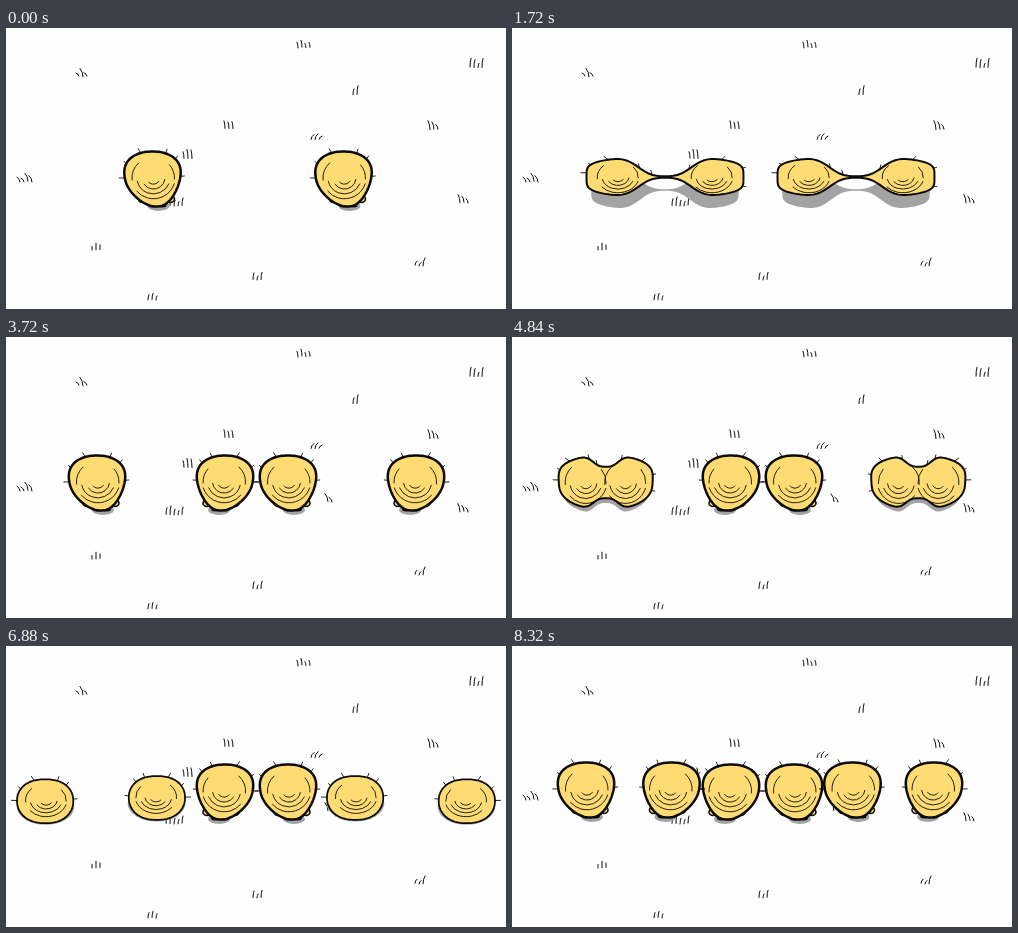
An HTML page with a canvas for the animation above (9280 ms loop, 500 px wide and 281 px high).

```html
<!DOCTYPE html>
<html lang="en">
<head>
<meta charset="utf-8">
<title>Splitting blobs</title>
<style>
  html, body { margin: 0; width: 100%; height: 100%; overflow: hidden; background: #fefefe; }
  canvas { display: block; width: 500px; height: 281px; }
</style>
</head>
<body>
<canvas id="stage" width="500" height="281"></canvas>
<script>
const LOOP = 9280, SPLIT_AT = 960, RESPLIT_AT = 4680, GATHER_AT = 7920;
const YELLOW = '#ffdc73', INK = '#0b0b0b', SHADE = '#a3a3a3', PAPER = '#fefefe';
const { PI, sin, cos, exp, abs, sign, min, max, floor } = Math;
const ctx = document.getElementById('stage').getContext('2d');
ctx.lineCap = ctx.lineJoin = 'round';

const lerp = (a, b, k) => a + (b - a) * k;
const random = seed => { const v = sin(seed * 12.9898) * 43758.5453; return v - floor(v); };
const power = (v, e) => sign(v) * abs(v) ** e;

function placed(x, y, flip, draw) {
  ctx.save();
  ctx.translate(x, y);
  if (flip) ctx.scale(-1, 1);
  draw();
  ctx.restore();
}

function ink(width) {
  ctx.strokeStyle = INK;
  ctx.lineWidth = width;
  ctx.stroke();
}

function paint(fill, width) {
  ctx.fillStyle = fill;
  ctx.fill();
  if (width) ink(width);
}

function oval(x, y, rx, ry, fill, width) {
  ctx.beginPath();
  ctx.ellipse(x, y, rx, ry, 0, 0, PI * 2);
  paint(fill, width);
}

// An outline is a function from angle to point.
function trace(outline, squeeze = 1, drop = 0) {
  ctx.beginPath();
  for (let i = 0; i < 120; i++) {
    const [x, y] = outline(i / 120 * PI * 2);
    ctx.lineTo(x * squeeze, y + drop);
  }
  ctx.closePath();
}

function body(outline, width, drawCreases) {
  trace(outline);
  paint(YELLOW, width);
  ctx.save();
  ctx.clip();
  drawCreases();
  ctx.restore();
}

// Nested bowls, with a bracket on both sides of the largest.
function creases(x, y, rx, ry) {
  const arc = (r, from, to) => {
    ctx.beginPath();
    ctx.ellipse(x, y, rx * r, ry * r, 0, from, to);
    ink(0.9);
  };
  for (let i = 1; i < 5; i++) {
    arc(0.05 + i * 0.18, 0.1 + random(i) * 0.5, PI - 0.1 - random(i + 9) * 0.6);
  }
  arc(0.75, -0.7, 0.05);
  arc(0.77, PI - 0.1, PI + 0.8);
}

function hairs(outline, count) {
  ctx.beginPath();
  for (let i = 0; i < count; i++) {
    const angle = lerp(-PI, 0, i / (count - 1)) + (random(i + 3) - 0.5) * 0.5;
    const [x, y] = outline(angle), lean = random(i) * 3 - 1.5;
    ctx.moveTo(x, y);
    ctx.lineTo(x + cos(angle) * 4 + lean, y + sin(angle) * 4.5);
  }
  ink(0.9);
}

// rise: 0 flat, 1 upright. tail: length of the torn neck on the right.
const blobOutline = (rise, tail = 0) => angle => {
  const c = cos(angle), s = sin(angle), low = max(0, s);
  const x = lerp(29.5, 27.5, rise) * power(c, lerp(0.85, 0.95, rise)) * (1 - 0.23 * rise * s);
  return [x + 4 * rise * low * low + tail * max(0, c) ** 8, lerp(21.5, 27.5, rise) * power(s, 0.95)];
};

function blob(x, y, rise, flip, wide = 1, tail = 0) {
  const round = blobOutline(rise, tail);
  const outline = angle => { const [px, py] = round(angle); return [px * wide, py]; };
  placed(x, y, flip, () => {
    if (tail) {
      trace(outline, 0.95, 5 + tail / 4);
      paint(SHADE);
    } else {
      oval(6 * rise, lerp(rise ? 4 : 7, 27, rise), lerp(30, 11, rise), lerp(19, 5, rise), SHADE);
    }
    if (rise === 1) {
      for (const side of [-1, 1]) {
        oval(4 + side * 14, 20, 4, 3.5, YELLOW, 1.6);
        oval(5 + side * 5, 26, 4, 2.5, INK);
      }
    }
    body(outline, lerp(1.7, 2.5, rise), () => creases(1, -1, 28 * wide, lerp(21, 27, rise)));
    hairs(outline, 6);
  });
}

// p: 0 upright, 1 pinched in the middle, 2 drawn out to a thin neck.
function dumbbell(p) {
  const pose = (a, b, c) => p < 1 ? lerp(a, b, p) : lerp(b, c, p - 1);
  const length = pose(28, 59.5, 78.5), height = pose(27.5, 27, 20.5);
  const pinch = pose(0, 0.7, 0.96), neck = pose(10, 18, 31);
  const blunt = pose(1, 0.45, 0.45), taper = pose(0.23, 0, 0);
  const outline = angle => {
    const s = sin(angle), x = length * cos(angle) * (1 - taper * s);
    const waist = 1 - pinch * exp(-(abs(x / neck) ** 3));
    return [x, height * power(s, blunt) * waist];
  };
  placed(pose(146.5, 153.5, 153), pose(151, 148.5, 149), false, () => {
    trace(outline, 0.94, pose(3, 6, 13));
    paint(SHADE);
    body(outline, 2, () => {
      const reach = pose(0, 33, 47);
      for (const side of p < 0.3 ? [0] : [-1, 1]) creases(side * reach, 0, 27, height);
    });
    hairs(outline, 9);
    const slit = 1 - abs(p - 1) * 2;
    for (let i = 0; slit > 0.3 && i < 3; i++) {
      oval((i % 2) * 3 - 3, i * 4.5 - 1, (7 - i) * slit, 1.6 * slit, PAPER, 1.3);
    }
  });
}

// One division, at time u after its start; the second one lands closer.
function divide(u, second) {
  if (u < 920) {
    const step = u >= 760 ? 8 : min(7, floor(u / 80));
    dumbbell(step < 5 ? (step + 1) / 5 : 1 + (step - 4) / 4);
    return;
  }
  const left = 1 - max(0, 4 - floor((u - 920) / 80)) / 5;
  const apart = 1 - (1 - left) ** 2;
  const stage = [2200, 2400, 2600, 2760].filter(at => u >= at).length / 4;
  const rise = stage * stage, wide = 1 - 0.06 * sin(PI * stage);
  const tail = 30 * (1 - apart), tight = second ? 5 : 0;
  const x = lerp(lerp(104, 96.5, apart), 91, rise), y = lerp(lerp(149, 160, apart), 146, rise);
  const farX = lerp(lerp(200, 212.5, apart), 219, rise), farY = lerp(lerp(149, 156.5, apart), 146, rise);
  const settle = second ? 2 * rise : 0;
  blob(x, y + settle, rise, false, wide, tail);
  blob(farX - tight, farY + settle, rise, true, wide, tail);
}

// x, y, number of blades, lean to the left at the tip
const TUFTS = [[77, 45, 3, 3], [298, 16, 4, 1], [470, 36, 4, -1], [349, 63, 2, -1],
  [223, 97, 3, 1], [309, 108, 3, -3], [428, 98, 3, 2], [182, 127, 3, 1],
  [168, 174, 5, -1], [324, 161, 2, 3], [20, 150, 4, 3], [458, 171, 3, 2],
  [413, 234, 3, -2], [90, 218, 3, 0], [146, 268, 3, -1], [251, 248, 3, -1]];

function meadow() {
  ctx.beginPath();
  TUFTS.forEach(([x, y, count, lean], n) => {
    for (let i = 0; i < count; i++) {
      const foot = x + (i - (count - 1) / 2) * 4, base = y + 3 + random(n + i);
      const tall = 3 + random(n * 5 + i) * 6;
      ctx.moveTo(foot - lean, base - tall);
      ctx.quadraticCurveTo(foot, base - tall * 0.6, foot, base);
    }
  });
  ink(1);
}

function draw(t) {
  ctx.fillStyle = PAPER;
  ctx.fillRect(0, 0, 500, 281);
  meadow();
  if (t < SPLIT_AT) {
    for (const x of [146.5, 337.5]) blob(x, 151, 1, false);
    return;
  }
  if (t < RESPLIT_AT) {
    for (const dx of [0, 191]) placed(dx, 0, false, () => divide(t - SPLIT_AT, false));
    return;
  }
  blob(219, 146, 1, true);
  blob(282, 146, 1, false);
  if (t < GATHER_AT) {
    placed(-57, -4, false, () => divide(t - RESPLIT_AT, true));
    placed(557, -4, true, () => divide(t - RESPLIT_AT, true));
    return;
  }
  // A short step back, then inward.
  const k = min(6, floor((t - GATHER_AT) / 80) + 1) / 6;
  const move = k * k * (3 - 2 * k) - 0.2 * (1 - k) ** 2;
  blob(lerp(35, 74, move), 144, 1, false);
  blob(lerp(157, 159.5, move), 144, 1, true);
  blob(lerp(343, 340.5, move), 144, 1, false);
  blob(lerp(465, 422, move), 144, 1, true);
}

const begin = performance.now();
function tick() {
  draw((performance.now() - begin) % LOOP);
  requestAnimationFrame(tick);
}
tick();
</script>
</body>
</html>
```
